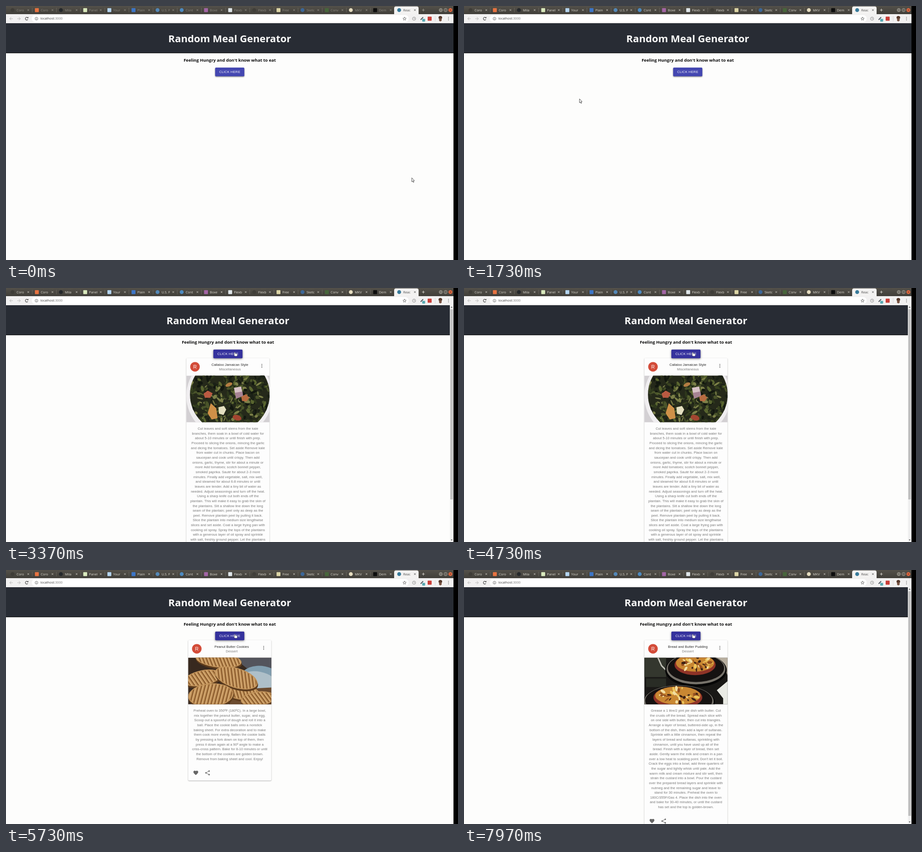
Write an HTML page with a canvas that moves like this. It is 998 px wide and 561 px high and loops after 8000 ms.

```html
<!DOCTYPE html>
<html lang="en">
<head>
<meta charset="utf-8">
<title>Random Meal Generator</title>
<style>
  html, body { margin: 0; width: 100%; height: 100%; overflow: hidden; background: #000; }
  canvas { display: block; }
</style>
</head>
<body>
<canvas id="stage" width="998" height="561"></canvas>
<script>
const ctx = document.getElementById('stage').getContext('2d');
const LOOP = 8000;
const UI = '"Open Sans", "Noto Sans", sans-serif';
const BODY = '"Liberation Sans", Arial, sans-serif';
const PITCH = 53.35;
const LINE = 10.65;

// ---- helpers ----
function rect(x, y, w, h, fill, r = 0) {
  ctx.fillStyle = fill;
  ctx.beginPath();
  ctx.roundRect(x, y, w, h, r);
  ctx.fill();
}
function oval(x, y, rx, ry, fill, turn = 0) {
  ctx.fillStyle = fill;
  ctx.beginPath();
  ctx.ellipse(x, y, rx, ry, turn, 0, Math.PI * 2);
  ctx.fill();
}
const dot = (x, y, r, fill) => oval(x, y, r, r, fill);
function ring(x, y, r, color, width = 1, from = 0, to = Math.PI * 2) {
  ctx.strokeStyle = color;
  ctx.lineWidth = width;
  ctx.beginPath();
  ctx.arc(x, y, r, from, to);
  ctx.stroke();
}
function line(color, width, ...pts) {
  ctx.strokeStyle = color;
  ctx.lineWidth = width;
  ctx.beginPath();
  for (let i = 0; i < pts.length; i += 2) ctx.lineTo(pts[i], pts[i + 1]);
  ctx.stroke();
}
function poly(fill, ...pts) {
  ctx.fillStyle = fill;
  ctx.beginPath();
  for (let i = 0; i < pts.length; i += 2) ctx.lineTo(pts[i], pts[i + 1]);
  ctx.closePath();
  ctx.fill();
}
function text(str, x, y, font, fill, align = 'left', spacing = 0) {
  ctx.font = font;
  ctx.fillStyle = fill;
  ctx.textAlign = align;
  ctx.letterSpacing = spacing + 'px';
  ctx.fillText(str, x, y);
}
function cross(x, y, r, color, width = 1) {
  line(color, width, x - r, y - r, x + r, y + r);
  line(color, width, x + r, y - r, x - r, y + r);
}
function seeded(seed) {
  return () => (seed = (seed * 16807) % 2147483647) / 2147483647;
}
const clamp = v => Math.max(0, Math.min(1, v));
const smooth = v => v * v * (3 - 2 * v);

// ---- dish pictures, 184 x 103 ----
function greens() {
  rect(0, 0, 184, 104, '#d3d0d3');
  oval(95, 45, 95, 93, '#f0eef0');
  oval(96, 42, 88, 85, '#25291a');
  ctx.save();
  ctx.beginPath();
  ctx.ellipse(96, 42, 88, 85, 0, 0, 7);
  ctx.clip();
  const rnd = seeded(71);
  const tones = ['#38421f', '#59652f', '#1b2116', '#7c8048', '#2e381c', '#4a542a', '#12170f'];
  for (let i = 0; i < 330; i++) {
    oval(rnd() * 184, rnd() * 104, 2 + rnd() * 6, 1 + rnd() * 3, tones[i % 7], rnd() * 3);
  }
  ctx.restore();
  poly('#ba5a42', 38, 40, 47, 33, 58, 39, 53, 49, 41, 49);
  poly('#b76b40', 121, 46, 132, 41, 139, 49, 133, 57, 123, 56);
  poly('#cf9148', 47, 83, 54, 61, 66, 72, 69, 94, 56, 97);
  poly('#e4dfc0', 71, 70, 83, 67, 88, 75, 82, 87, 72, 84);
  poly('#d7c1c6', 105, 27, 121, 24, 125, 44, 110, 51);
  poly('#a68293', 107, 38, 124, 35, 125, 45, 110, 51);
  oval(112, 93, 10, 6, '#a34530', .3);
  oval(94, 20, 8, 4, '#b47d43', -.4);
}
function cookie(x, y, rx, ry, turn, slant) {
  oval(x + 1, y + 4, rx, ry, '#5d3b1c', turn);
  oval(x, y, rx, ry, '#c2935a', turn);
  ctx.save();
  ctx.beginPath();
  ctx.ellipse(x, y, rx - 2, ry - 2, turn, 0, 7);
  ctx.clip();
  ctx.translate(x, y);
  ctx.rotate(turn);
  for (let i = -rx; i < rx; i += 8) {
    line('#8d5e2f', 2.6, i - slant, -ry, i + slant, ry);
    line('#d9b07a', 1.5, i + 3 - slant, -ry, i + 3 + slant, ry);
  }
  ctx.restore();
}
function cookies() {
  rect(0, 0, 184, 104, '#38291f');
  poly('#53545c', 100, 0, 184, 0, 184, 30, 130, 24);
  oval(164, 50, 48, 31, '#819eaf', .2);
  oval(155, 55, 42, 24, '#aebfc8', .2);
  poly('#6c4b2f', 90, 104, 110, 70, 184, 66, 184, 104);
  cookie(67, 5, 51, 17, .12, 9);
  cookie(32, 45, 42, 17, -.2, 7);
  cookie(117, 76, 42, 17, .15, 8);
  cookie(106, 45, 49, 22, .3, 10);
  cookie(154, 91, 38, 16, -.12, 9);
  cookie(50, 83, 50, 26, -.08, -9);
}
function pan(x, y, rx, ry, seed) {
  oval(x, y + 3, rx + 3, ry + 3, '#060606');
  oval(x, y, rx, ry, '#77736b');
  oval(x, y - 2, rx - 3, ry - 3, '#151211');
  oval(x - 2, y - 9, rx * .7, ry * .67, '#8f3327');
  oval(x - 2, y - 13, rx * .65, ry * .56, '#c98732');
  const rnd = seeded(seed);
  const tones = ['#edc65b', '#f2dda0', '#945021', '#3b2014'];
  for (let i = 0; i < 36; i++) {
    const a = rnd() * 6.3, d = Math.sqrt(rnd());
    oval(x - 2 + Math.cos(a) * d * rx * .57, y - 13 + Math.sin(a) * d * ry * .48,
      2 + rnd() * 5, 1 + rnd() * 2.5, tones[i % 4], a);
  }
}
function pans() {
  rect(0, 0, 184, 104, '#191816');
  rect(0, 0, 48, 43, '#34372e');
  rect(4, 46, 44, 19, '#292c25');
  poly('#e9eae4', 184, 52, 160, 72, 174, 90, 174, 104, 184, 104);
  poly('#b8afa0', 153, 0, 184, 0, 184, 40, 174, 16);
  line('#c0bfb5', 3, 30, 0, 38, 18, 51, 31);
  pan(114, 25, 65, 34, 29);
  pan(76, 97, 77, 36, 83);
}

// ---- meals ----
const MEALS = [
  { title: 'Callaloo Jamaican Style', kind: 'Miscellaneous', scroll: 420, photo: greens, lines: `Cut leaves and soft stems from the kale
branches, them soak in a bowl of cold water for
about 5-10 minutes or until finish with prep.
Proceed to slicing the onions, mincing the garlic
and dicing the tomatoes. Set aside Remove kale
from water cut in chunks. Place bacon on
saucepan and cook until crispy. Then add
onions, garlic, thyme, stir for about a minute or
more Add tomatoes; scotch bonnet pepper,
smoked paprika. Sauté for about 2-3 more
minutes. Finally add vegetable, salt, mix well,
and steamed for about 6-8 minutes or until
leaves are tender. Add a tiny bit of water as
needed. Adjust seasonings and turn off the heat.
Using a sharp knife cut both ends off the
plantain. This will make it easy to grab the skin of
the plantains. Slit a shallow line down the long
seam of the plantain; peel only as deep as the
peel. Remove plantain peel by pulling it back.
Slice the plantain into medium size lengthwise
slices and set aside. Coat a large frying pan with
cooking oil spray. Spray the tops of the plantains
with a generous layer of oil spray and sprinkle
with salt, freshly ground pepper. Let the plantains
fry on medium heat until golden brown.` },
  { title: 'Peanut Butter Cookies', kind: 'Dessert', scroll: 0, photo: cookies, lines: `Preheat oven to 350ºF (180ºC). In a large bowl,
mix together the peanut butter, sugar, and egg.
Scoop out a spoonful of dough and roll it into a
ball. Place the cookie balls onto a nonstick
baking sheet. For extra decoration and to make
them cook more evenly, flatten the cookie balls
by pressing a fork down on top of them, then
press it down again at a 90º angle to make a
criss-cross pattern. Bake for 8-10 minutes or until
the bottom of the cookies are golden brown.
Remove from baking sheet and cool. Enjoy!` },
  { title: 'Bread and Butter Pudding', kind: 'Dessert', scroll: 496, photo: pans, lines: `Grease a 1 litre/2 pint pie dish with butter. Cut
the crusts off the bread. Spread each slice with
on one side with butter, then cut into triangles.
Arrange a layer of bread, buttered-side up, in the
bottom of the dish, then add a layer of sultanas.
Sprinkle with a little cinnamon, then repeat the
layers of bread and sultanas, sprinkling with
cinnamon, until you have used up all of the
bread. Finish with a layer of bread, then set
aside. Gently warm the milk and cream in a pan
over a low heat to scalding point. Don't let it boil.
Crack the eggs into a bowl, add three quarters of
the sugar and lightly whisk until pale. Add the
warm milk and cream mixture and stir well, then
strain the custard into a bowl. Pour the custard
over the prepared bread layers and sprinkle with
nutmeg and the remaining sugar and leave to
stand for 30 minutes. Preheat the oven to
180C/355F/Gas 4. Place the dish into the oven
and bake for 30-40 minutes, or until the custard
has set and the top is golden-brown.` }
].map(m => ({ ...m, lines: m.lines.split('\n') }));

// ---- browser ----
// label, icon colour, icon shape (o circle, s square)
const TABS = [
  ['Coro', '#3f3d38', 'o'], ['Coro', '#e87340', 's'], ['Mila', '#25282b', 'o'],
  ['Panel', '#d9e9bd', 's'], ['Your', '#b4d4ef', 's'], ['Plain', '#3d76c8', 's'],
  ['U.S. F', '#5488b7', 'o'], ['Cont', '#4d8ac0', 'o'], ['Boxe', '#a365a5', 's'],
  ['Flexb', '#dfe6e9', 's'], ['Flexb', '#403e39', 'o'], ['Free', '#dcd5a6', 's'],
  ['Sketc', '#3c6799', 'o'], ['Conv', '#47663b', 's'], ['MKV', '#e5dcbf', 'o'],
  ['Dem', '#0d0d0d', 's'], ['Reac', '#397b9b', 'o']
];

function drawTabs(focused) {
  const grad = ctx.createLinearGradient(0, 0, 0, 18);
  grad.addColorStop(0, '#54514a');
  grad.addColorStop(1, '#403e39');
  rect(0, 0, 988, 18, grad);
  rect(857, 1, 54, 20, '#f3f2f1', [4, 4, 0, 0]);
  TABS.forEach(([label, color, shape], i) => {
    const x = i * PITCH, active = i === 16;
    const ink = active ? '#4e4e4e' : focused ? '#dedbd2' : '#8d8a82';
    if (shape === 'o') dot(x + 14.5, 9, 4.3, color);
    else rect(x + 10.5, 4.8, 8.6, 8.6, color, 1);
    ctx.save();
    ctx.beginPath();
    ctx.rect(x + 22, 0, 20.5, 18);
    ctx.clip();
    text(label, x + 23.3, 11.6, '7.3px ' + UI, ink);
    ctx.restore();
    cross(x + 49.2, 9, 1.8, active ? '#444' : focused ? '#d2cfc6' : '#9b988f', .9);
    if (i < 15) line('#77746b', .7, x + 58, 4, x + 58, 14);
  });
  const plus = focused ? '#e0ddd5' : '#a19e96';
  line(plus, 1, 918.5, 9, 924.5, 9);
  line(plus, 1, 921.5, 6, 921.5, 12);
  ['#88857c', '#88857c', '#df6840'].forEach((c, i) => {
    const x = 960 + i * 10.6;
    dot(x, 9, 4.3, c);
    if (i === 0) line('#403e39', .9, x - 2, 9, x + 2, 9);
    if (i === 1) { ctx.strokeStyle = '#403e39'; ctx.strokeRect(x - 1.7, 7.5, 3.4, 3); }
    if (i === 2) cross(x, 9, 1.6, '#512b20', .8);
  });
}

function drawToolbar() {
  rect(0, 18, 988, 20, '#f2f1f1');
  rect(57, 20, 832, 15.5, '#ffffff', 7.5);
  for (const [x, s] of [[11.5, -1], [28.5, 1]]) {
    line('#b5b5b5', 1, x - 3.5, 28, x + 3.5, 28);
    line('#b5b5b5', 1, x, 24.7, x + 3.3 * s, 28, x, 31.3);
  }
  ring(45.7, 28, 3, '#4b4b4b', 1.2, .5, 5.5);
  poly('#4b4b4b', 46.2, 26.9, 49.4, 26.9, 49.4, 23.7);
  ring(67.3, 28, 3.2, '#5c5c5c', .8);
  line('#5c5c5c', .9, 67.3, 27.4, 67.3, 30);
  dot(67.3, 26.2, .5, '#5c5c5c');
  text('localhost', 76, 30.4, '7.27px ' + UI, '#3b3b3b');
  text(':3000', 76 + ctx.measureText('localhost').width, 30.4, '7.27px ' + UI, '#777');
  const star = [];
  for (let i = 0; i < 11; i++) {
    const a = -Math.PI / 2 + i * Math.PI / 5, r = i % 2 ? 1.7 : 3.9;
    star.push(880 + Math.cos(a) * r, 28.2 + Math.sin(a) * r);
  }
  line('#555', .8, ...star);
  ring(901, 28, 3.6, '#858585', .9);
  line('#858585', .8, 901, 25.8, 901, 28.4, 902.7, 28.4);
  line('#555d65', 2.2, 915.5, 30.5, 921, 24.7);
  rect(919, 28.6, 6.4, 6, '#57a9b2', 1);
  rect(931, 23.6, 8.8, 8.8, '#c93e38', 1);
  line('#ccc', .7, 947.5, 22, 947.5, 34);
  oval(959, 25.6, 4, 3.7, '#55382b');
  oval(959, 30.6, 3, 3.3, '#795443');
  for (const y of [25, 28, 31]) dot(977, y, .8, '#4d4d4d');
}

function drawScrollbar(length) {
  rect(980, 38, 8, 523, '#f1f1f1');
  rect(981, 47, 6, length, '#c1c1c1');
  poly('#505050', 984, 40.8, 986, 43.4, 982, 43.4);
  poly('#505050', 984, 558, 986, 555.4, 982, 555.4);
}

// ---- page ----
const HEART = new Path2D('M12 21.35l-1.45-1.32C5.4 15.36 2 12.28 2 8.5 2 5.42 4.42 3 7.5 3c1.74 0 3.41.81 4.5 2.09C13.09 3.81 14.76 3 16.5 3 19.58 3 22 5.42 22 8.5c0 3.78-3.4 6.86-8.55 11.54L12 21.35z');

function shadow(blur, dy, alpha) {
  ctx.shadowColor = `rgba(0,0,0,${alpha})`;
  ctx.shadowBlur = blur;
  ctx.shadowOffsetY = dy;
}

function drawCard(meal, photo, mid) {
  const x = mid - 91.8;
  const last = 310.5 + (meal.lines.length - 1) * LINE;
  ctx.save();
  shadow(2, .7, .38);
  rect(x, 155, 183.6, last + 48 - 155, '#fdfdfd', 2);
  ctx.restore();

  dot(x + 19.1, 174.1, 10.6, '#d34c39');
  text('R', x + 19.1, 177.9, '10.6px ' + BODY, '#fff', 'center');
  const font = '7.45px ' + BODY;
  text(meal.title, mid + 4.3, 171.6, font, '#292929', 'center', .08);
  text(meal.kind, mid + 4.3, 182.2, font, '#7d7d7d', 'center', .08);
  for (const y of [168.8, 172, 175.2]) dot(x + 166.7, y, 1.05, '#686868');

  ctx.save();
  ctx.beginPath();
  ctx.rect(x, 193.4, 183.6, 103.2);
  ctx.clip();
  ctx.translate(x, 193.4);
  photo();
  ctx.restore();

  meal.lines.forEach((str, i) =>
    text(str, mid, 313.1 + i * LINE, font, '#777', 'center', .08));

  const y = last + 31;
  ctx.save();
  ctx.translate(x + 10.5, y - 6.4);
  ctx.scale(.532, .532);
  ctx.fillStyle = '#666';
  ctx.fill(HEART);
  ctx.restore();
  line('#666', 1, x + 46.2, y - 4, x + 39.2, y, x + 46.2, y + 4);
  dot(x + 46.2, y - 3.9, 1.6, '#666');
  dot(x + 39.2, y, 1.6, '#666');
  dot(x + 46.2, y + 3.9, 1.6, '#666');
}

function drawPage(meal, photo, hover) {
  const bar = meal && meal.scroll;
  const width = bar ? 980 : 988, mid = width / 2;
  rect(0, 38, 988, 523, '#fdfdfc');
  rect(0, 38, width, 66, '#282c34');
  rect(0, 103, width, 1.2, '#050505');
  text('Random Meal Generator', mid, 80, 'bold 22.2px ' + UI, '#fbfbfa', 'center');
  text("Feeling Hungry and don't know what to eat", mid, 122.8, 'bold 9.47px ' + UI, '#0b0b0b', 'center');
  if (meal) drawCard(meal, photo, mid);
  const mix = (a, b) => Math.round(a + (b - a) * hover);
  ctx.save();
  shadow(2.5 + hover * 2, 1.2, .5);
  rect(mid - 32.2, 136, 64.4, 19.2, `rgb(${mix(68, 53)},${mix(71, 50)},${mix(177, 157)})`, 2);
  ctx.restore();
  text('CLICK HERE', mid, 148.2, '7.45px ' + BODY, '#f4f4fb', 'center', .21);
  if (bar) drawScrollbar(meal.scroll);
}

// ---- pointer ----
const PATH = [
  [0, 896, 379.5], [60, 896, 379.5], [630, 286.7, 195], [800, 286.7, 195],
  [1080, 255, 205], [1750, 255, 205], [2350, 492, 144], [2820, 492, 144],
  [2960, 505.5, 142], [LOOP, 505.5, 142]
];
function pointerAt(t) {
  const i = Math.max(1, PATH.findIndex(p => p[0] >= t));
  const [t0, x0, y0] = PATH[i - 1], [t1, x1, y1] = PATH[i];
  const k = smooth((t - t0) / (t1 - t0));
  return [x0 + (x1 - x0) * k, y0 + (y1 - y0) * k];
}
function outlined(...pts) {
  poly('#fff', ...pts);
  line('#202020', .8, ...pts, pts[0], pts[1]);
}
function drawPointer(x, y, hand) {
  ctx.save();
  ctx.translate(x, y);
  ctx.lineJoin = 'round';
  if (hand) {
    poly('#fff', -1, 0, .6, 0, .8, 3, 5, 3.5, 5.4, 6, 4.4, 8.6, -.2, 8.6, -2.8, 5, -1, 5);
    line('#333', .5, -1, 0, .6, 0, .8, 3, 5, 3.5, 5.4, 6, 4.4, 8.6, -.2, 8.6, -2.8, 5, -1, 5, -1, 0);
  } else {
    outlined(0, 0, 0, 8.8, 1.9, 7, 3.3, 10.1, 4.8, 9.4, 3.4, 6.4, 5.8, 6.2);
  }
  ctx.restore();
}

// ---- timeline ----
const SHOWN = [2980, 5330, 7250];
const LOADED = [2980, 5430, 7400];
const latest = (times, t) => times.filter(at => t >= at).length - 1;

function draw(t) {
  ctx.fillStyle = '#000';
  ctx.fillRect(0, 0, 998, 561);
  const meal = MEALS[latest(SHOWN, t)];
  const pic = MEALS[latest(LOADED, t)];
  drawPage(meal, pic && pic.photo, clamp((t - 2230) / 250));
  drawTabs(t >= 1250);
  drawToolbar();
  drawPointer(...pointerAt(t), t >= 2230);
  rect(988, 0, 10, 561, '#000');
}
function tick() {
  draw(performance.now() % LOOP);
  requestAnimationFrame(tick);
}
tick();
</script>
</body>
</html>
```
